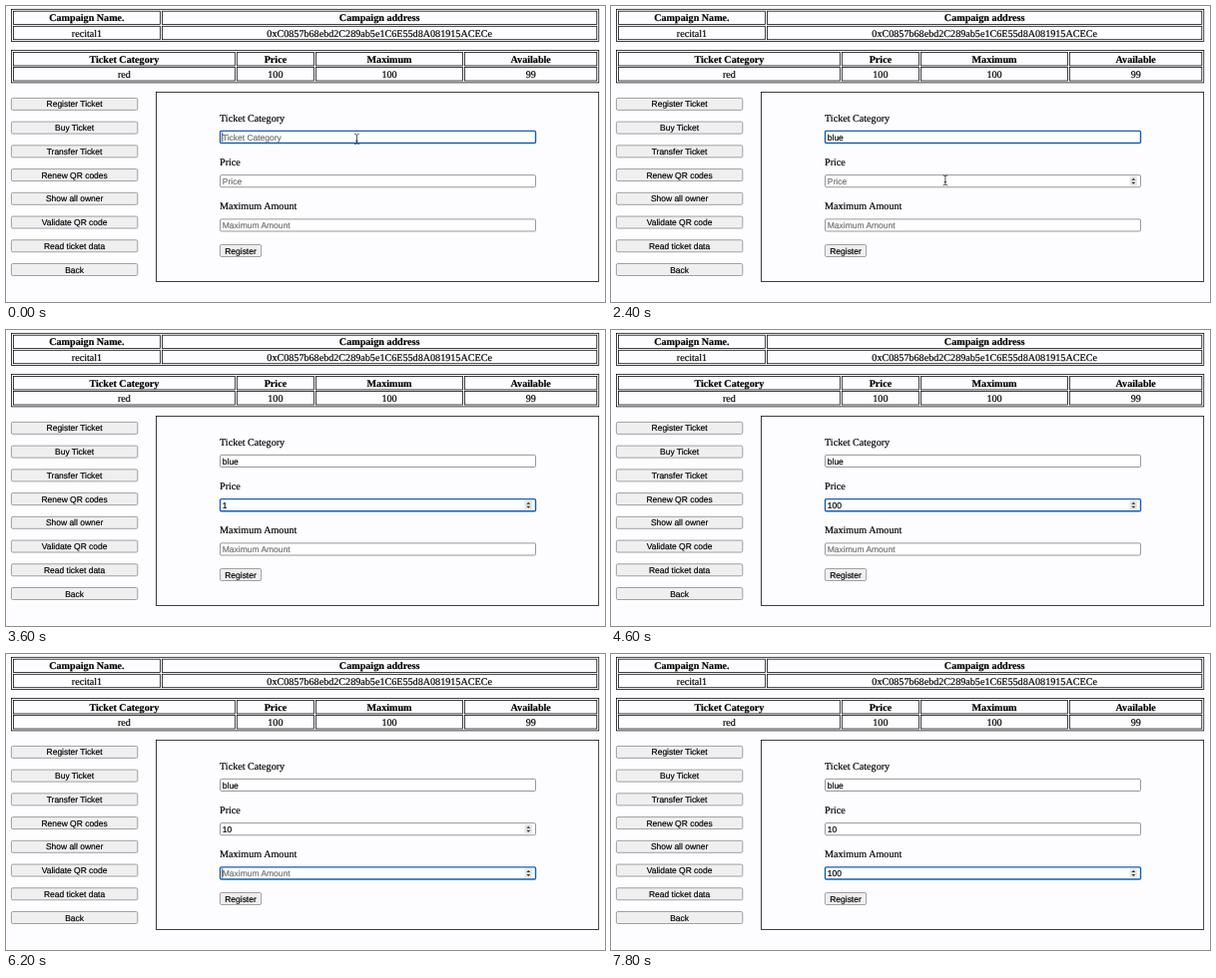
An HTML page that plays this animation: 600x297 px, repeating every 8000 ms.

```html
<!DOCTYPE html>
<html lang="en">
<head>
<meta charset="utf-8">
<title>Register ticket</title>
<style>
  html, body { margin: 0; width: 100%; height: 100%; overflow: hidden; background: #fdfcfe; }
  svg { display: block; width: 600px; height: 297px; }
  text {
    font: 10.15px "Liberation Serif", Times, serif; text-rendering: geometricPrecision;
    white-space: pre; fill: #000; stroke: #000; stroke-width: .18;
  }
  .mid { text-anchor: middle; }
  .head { font-weight: bold; }
  .ui { font: 8.47px "Liberation Sans", Arial, sans-serif; }
  .line { fill: none; stroke: #000; stroke-width: .75; }
  .button { fill: #efefef; stroke: #858585; stroke-width: .75; }
  .input { fill: #fff; stroke: #767676; stroke-width: .75; }
  .input.focus { stroke: #1160b5; stroke-width: 1.4; }
  .hint { fill: #707070; stroke: #707070; }
  .spin rect { fill: #e6e6e6; }
  .spin path { fill: #333; }
  #pointer { fill: none; stroke: #222; stroke-width: .8; }
</style>
</head>
<body>
<svg id="stage" viewBox="0 0 600 297"></svg>
<script>
const stage = document.getElementById('stage');
const LOOP = 8000;

function add(tag, attrs, text = '', parent = stage) {
  const el = document.createElementNS('http://www.w3.org/2000/svg', tag);
  for (const key in attrs) el.setAttribute(key, attrs[key]);
  el.textContent = text;
  parent.append(el);
  return el;
}
const box = (cls, x, y, width, height, rx = 0) =>
  add('rect', { class: cls, x, y, width, height, rx });
const label = (cls, x, y, text) => add('text', { class: cls, x, y }, text);
const show = (el, on) => el.setAttribute('visibility', on ? 'visible' : 'hidden');

// Bordered table: edges are the middles of the gaps between columns
function table(top, edges, rows) {
  box('line', 5.4, top, 588.4, 32.3);
  rows.forEach((row, r) => row.forEach((text, c) => {
    const left = edges[c] + 1, right = edges[c + 1] - 1;
    const y = top + 1.9 + r * 15.1;
    box('line', left, y, right - left, 13.4);
    label(r ? 'mid' : 'mid head', (left + right) / 2, y + 10.2, text);
  }));
}

function button(x, y, width, text) {
  box('button', x, y, width, 12, 1.4);
  label('ui mid', x + width / 2, y + 9, text);
}

table(3.3, [6.4, 155.5, 592.8], [
  ['Campaign Name.', 'Campaign address'],
  ['recital1', '0xC0857b68ebd2C289ab5e1C6E55d8A081915ACECe']
]);
table(44.6, [6.4, 230.3, 309.5, 458.6, 592.8], [
  ['Ticket Category', 'Price', 'Maximum', 'Available'],
  ['red', '100', '100', '99']
]);

['Register Ticket', 'Buy Ticket', 'Transfer Ticket', 'Renew QR codes',
 'Show all owner', 'Validate QR code', 'Read ticket data', 'Back']
  .forEach((text, i) => button(5.4, 92.4 + i * 23.73, 126.4, text));

box('line', 150.6, 86.6, 443.1, 190);

const fields = ['Ticket Category', 'Price', 'Maximum Amount'].map((name, i) => {
  const y = 125.4 + i * 44.25;
  label('', 214, y - 9.5, name);
  const frame = box('input', 214.5, y, 316, 12.1, 1.2);
  const value = label('ui', 216.8, y + 9.2, name);
  const spin = add('g', { class: 'spin', transform: `translate(523.3 ${y + 6.1})` });
  add('rect', { x: -3.8, y: -4.7, width: 7.6, height: 9.4, rx: 2 }, '', spin);
  add('path', { d: 'M-2-1L0-3.1 2-1zM-2 1L0 3.1 2 1z' }, '', spin);
  return { name, y, frame, value, spin };
});
button(214.4, 239.5, 41.2, 'Register');

const caret = add('rect', { width: .7, height: 9.4 });
const pointer = add('path', {
  id: 'pointer',
  d: 'M-2.3-5Q-.4-5 0-4Q.4-5 2.3-5M0-4.2V4.2M-2.3 5Q-.4 5 0 4Q.4 5 2.3 5M-1.2 1.7H1.2'
});

// Each step changes part of the state: at, values, focus, caret, pointer, hover
const steps = [
  { at: 0, values: ['', '', ''], focus: 0, caret: true, pointer: [351.4, 133.5], hover: -1 },
  { at: 1400, values: ['blu', '', ''], pointer: null },
  { at: 1600, values: ['blue', '', ''] },
  { at: 2000, pointer: [341, 170] },
  { at: 2200, pointer: [334.9, 174.9], caret: false },
  { at: 2400, hover: 1 },
  { at: 2600, focus: 1, caret: true },
  { at: 2800, pointer: null },
  { at: 3200, values: ['blue', '1', ''] },
  { at: 3600, caret: false },
  { at: 3800, values: ['blue', '10', ''], caret: true },
  { at: 4000, values: ['blue', '100', ''] },
  { at: 4600, caret: false },
  { at: 5000, values: ['blue', '1000', ''], caret: true },
  { at: 5200, values: ['blue', '100', ''] },
  { at: 5600, values: ['blue', '10', ''] },
  { at: 6000, caret: false },
  { at: 6200, focus: 2, caret: true },
  { at: 6800, values: ['blue', '10', '1'] },
  { at: 7000, values: ['blue', '10', '10'] },
  { at: 7200, values: ['blue', '10', '100'] },
  { at: 7800, caret: false, hover: -1 }
];
const states = steps.map((_, i) => Object.assign({}, ...steps.slice(0, i + 1)));

function draw(state) {
  fields.forEach((field, i) => {
    const text = state.values[i];
    field.value.textContent = text || field.name;
    field.value.classList.toggle('hint', !text);
    field.frame.classList.toggle('focus', i === state.focus);
    show(field.spin, i > 0 && (i === state.focus || i === state.hover));
  });
  const active = fields[state.focus];
  const width = state.values[state.focus] ? active.value.getComputedTextLength() : -.3;
  caret.setAttribute('x', 216.8 + width);
  caret.setAttribute('y', active.y + 1.3);
  show(caret, state.caret);
  show(pointer, state.pointer);
  if (state.pointer) pointer.setAttribute('transform', `translate(${state.pointer})`);
}

let current = null;
const start = performance.now();
function tick() {
  const time = (performance.now() - start) % LOOP;
  const state = states.filter(s => s.at <= time).pop();
  if (state !== current) draw(current = state);
  requestAnimationFrame(tick);
}
tick();
</script>
</body>
</html>
```
